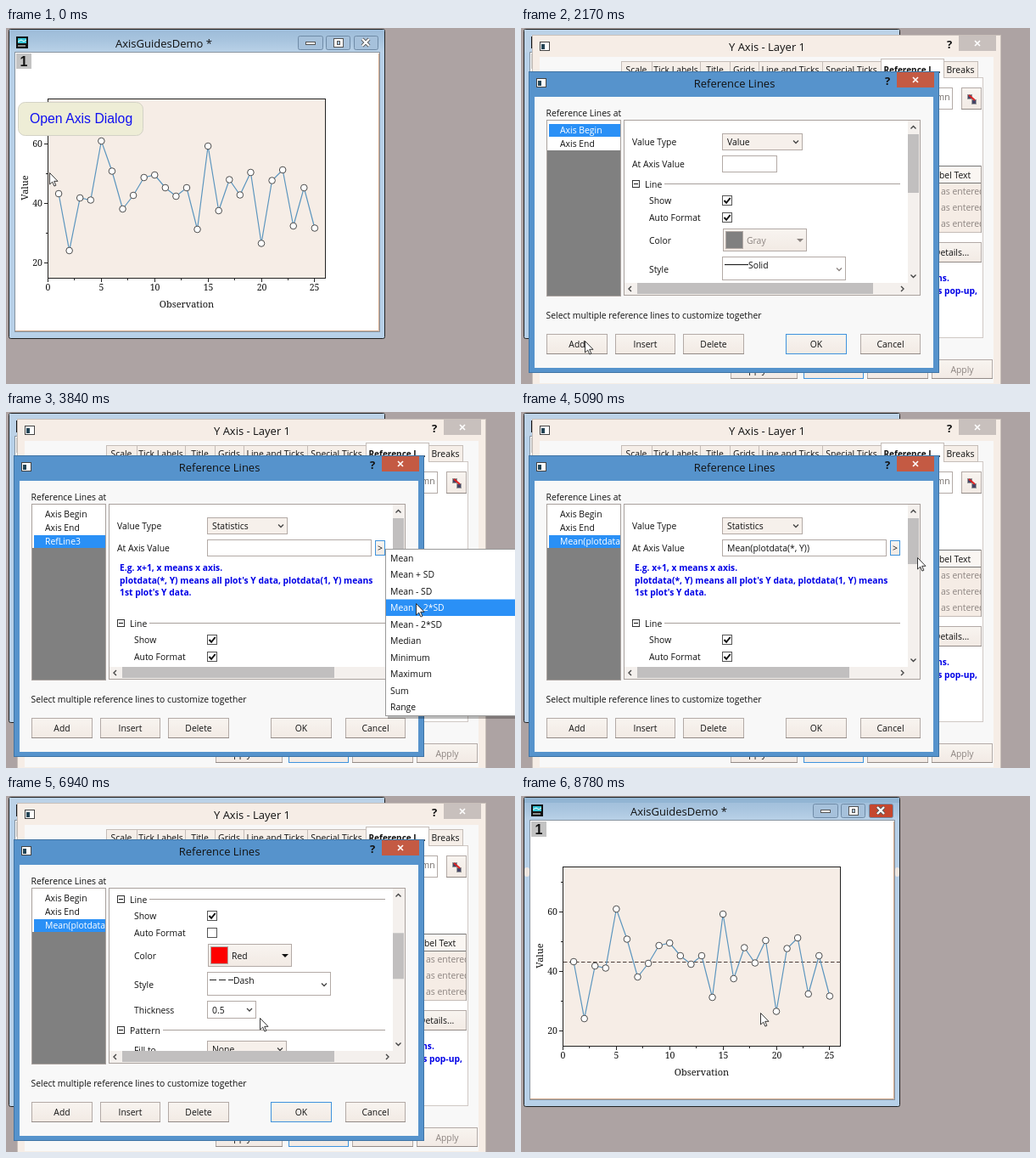
Recreate the animation shown at these times as an HTML page. Size 600x419 px, loop 8.88 s.

```html
<!DOCTYPE html>
<html lang="en">
<head>
<meta charset="utf-8">
<title>Reference line demo</title>
<style>
  html, body { margin: 0; width: 100%; height: 100%; overflow: hidden; background: #ada3a3; }
  svg { display: block; }
  text { font-family: "Open Sans", "Noto Sans", sans-serif; font-size: 10.4px; fill: #111; white-space: pre; }
  .bold { font-weight: 700; font-size: 10px; }
  .note { font-weight: 700; font-size: 10.3px; fill: #0000e6; }
  .tip { font-size: 9.4px; }
  .title { font-size: 13px; }
  .help { font-size: 13px; font-weight: 700; }
  .plot { font-family: "Noto Serif", serif; font-size: 10.5px; }
  .label { font-family: "Noto Serif", serif; font-size: 11px; }
  .badge { font: 700 16px "Liberation Sans", sans-serif; }
  .callout { font: 15.8px "Liberation Sans", sans-serif; fill: #1010f0; }
</style>
</head>
<body>
<svg id="stage" width="600" height="419" viewBox="0 0 600 419"></svg>
<script>
const LOOP = 8880;
const BLUE = '#2a90f6', FRAME = '#5693cc', BEIGE = '#f6ede6', PALE = '#f8f8f8';
const EDGE = '#b3aaa6', MUTED = '#8c8480', TRACK = '#f4f0ed', THUMB = '#c1bfbf';

// Timeline of user actions, in ms
const AT = {
  axisOpen: 450, tabPick: 1120, tip: 1240, tipGone: 1390, refOpen: 1780, add: 2390,
  typeOpen: 2910, typePick: 3110, typeDone: 3160, menuOpen: 3600, meanPick: 4730,
  dragStart: 5240, dragEnd: 5560, autoOff: 5730, colorOpen: 5890, red: 6120,
  styleOpen: 6500, dash: 6880, thickOpen: 7180, one: 7560, refClose: 8040, axisClose: 8440
};

const CURSOR = [
  [0, 51, 170], [450, 51, 170], [1090, 450, 52], [1200, 453, 54], [1360, 453, 54],
  [1740, 506, 264], [1800, 506, 264], [2200, 68, 370], [2420, 68, 370], [2860, 322, 136],
  [2940, 322, 136], [3060, 312, 178], [3280, 312, 178], [3550, 440, 161], [3640, 440, 161],
  [3950, 500, 250], [4270, 490, 172], [4730, 490, 172], [5060, 467, 171], [5100, 467, 171],
  [5230, 463, 150], [5560, 463, 186], [5700, 243, 161], [5740, 243, 161], [5860, 328, 190],
  [5900, 328, 190], [6080, 266, 230], [6180, 266, 234], [6460, 374, 223], [6530, 374, 223],
  [6720, 300, 262], [6890, 300, 262], [7140, 287, 252], [7200, 287, 252], [7480, 262, 318],
  [7600, 262, 318], [7750, 262, 330], [7930, 334, 363], [8060, 334, 363], [8300, 362, 398],
  [8460, 362, 398], [8660, 316, 340], [8780, 282, 255], [LOOP, 282, 255]
];

const POINTS = [195, 262, 200, 202.5, 133, 168.5, 213, 197, 176, 173, 188, 198, 188, 237, 139,
  215, 178.5, 196.5, 170, 253.5, 179.5, 167, 233, 188, 235.5];

const stage = document.getElementById('stage');

// Drawing helpers; boxes are given by their corner pixels
const box = (x0, y0, x1, y1, fill = 'none', stroke, extra = '') => stroke
  ? `<rect x="${x0 + .5}" y="${y0 + .5}" width="${x1 - x0 - 1}" height="${y1 - y0 - 1}" fill="${fill}" stroke="${stroke}" ${extra}/>`
  : `<rect x="${x0}" y="${y0}" width="${x1 - x0}" height="${y1 - y0}" fill="${fill}" ${extra}/>`;
const path = (d, stroke, width = 1, extra = '') =>
  `<path d="${d}" fill="none" stroke="${stroke}" stroke-width="${width}" ${extra}/>`;
const text = (x, y, s, cls = '', fill = '', anchor = 'start') =>
  `<text x="${x}" y="${y}" class="${cls}" text-anchor="${anchor}"${fill && ` style="fill:${fill}"`}>${s}</text>`;
const mid = (x, y, s, cls, fill) => text(x, y, s, cls, fill, 'middle');
const clip = (x0, y0, x1, y1, body) =>
  `<svg x="${x0}" y="${y0}" width="${x1 - x0}" height="${y1 - y0}" viewBox="${x0} ${y0} ${x1 - x0} ${y1 - y0}">${body}</svg>`;
const range = (n, f) => Array.from({ length: n }, (_, i) => f(i)).join('');

const button = (x0, y0, x1, y1, label, focus, fill) =>
  box(x0, y0, x1, y1, 'url(#face)', focus ? '#3f93dd' : EDGE) +
  (focus ? '' : path(`M${x0} ${y1 - .5}H${x1}`, '#938b87')) +
  mid((x0 + x1) / 2, (y0 + y1) / 2 + 4, label, '', fill);
const check = (x, y, on, off) => box(x, y, x + 12, y + 12, off ? '#d8cfca' : '#fff', off ? '#b9b0ac' : '#555') +
  (on ? path(`M${x + 2.5} ${y + 6}l2.6 2.8 4.6-5.8`, '#111', 2) : '');
const chevron = (x, y, color = '#444') => path(`M${x - 3} ${y - 1.5}l3 3 3-3`, color, 1.3);
const combo = (x0, y0, x1, y1, label, fill = '#fff', color = '') =>
  box(x0, y0, x1, y1, fill, EDGE) + text(x0 + 6, (y0 + y1) / 2 + 4, label, '', color) +
  chevron(x1 - 8, (y0 + y1) / 2, color || '#444');
const popup = (x0, y0, x1, y1) => box(x0 + 3, y0 + 3, x1 + 3, y1 + 3, '#0004') + box(x0, y0, x1, y1, '#fff', '#999');

function menu(x0, y0, x1, rowH, items, hover, draw) {
  return popup(x0, y0, x1, y0 + items.length * rowH + 2) + items.map((item, i) => {
    const y = y0 + 1 + i * rowH, on = i === hover;
    return (on ? box(x0 + 1, y, x1 - 1, y + rowH, BLUE) : '') +
      (draw ? draw(item, y, on) : text(x0 + 6, y + rowH / 2 + 4, item, '', on ? '#fff' : ''));
  }).join('');
}

function windowFrame(x0, y0, x1, y1, title, active, bar, side) {
  const cy = y0 + 10;
  return box(x0, y0, x1, y1, active ? FRAME : BEIGE, active ? '#3f74a5' : '#c9c0ba') +
    box(x0 + side, y0 + bar, x1 - side, y1 - 6, PALE) +
    box(x0 + 9, y0 + 8, x0 + 21, y0 + 19, '#fff', '#444') + box(x0 + 11, y0 + 11, x0 + 15, y0 + 17, '#245') +
    mid((x0 + x1) / 2 + .5, y0 + 18.5, title, 'title') + mid(x1 - 61, y0 + 15.5, '?', 'help') +
    box(x1 - 50, y0 + 1, x1 - 6, y0 + 19, active ? '#c45a43' : '#c8c0bd') +
    path(`M${x1 - 31} ${cy - 3}l6 6m0-6l-6 6`, '#fff', 1.6);
}

function graph(done, inactive) {
  const px = v => 49.5 + v * 12.575, py = v => 346 - v * 3.5;
  const xs = POINTS.map((_, i) => px(i + 1));
  let out = box(3, 1, 447, 366, '#b7d0e8', '#222', 'rx="2"') + box(4, 2, 446, 29, inactive ? '#bcd2e7' : 'url(#bar)');
  if (done) out += box(4, 2, 446, 8, '#92b5d3');
  out += box(10, 28, 441, 358, '#fff', '#87939f') + path('M11 356.5H439.5V30', '#d2a98c') +
    box(12, 10, 26, 24, '#111') + box(14, 12, 24, 18, '#38c6d8') + path('M14 16l4-2 3 2 3-2M14 21h9', '#fff') +
    mid(186, 23, 'AxisGuidesDemo *', 'title');
  [[344, 374], [377, 406], [410, 439]].forEach(([a, b], i) => {
    out += box(a, 9, b, 26, done && i === 2 ? '#c5472e' : '#a6c1db', '#6f8ba7', 'rx="2"');
  });
  out += box(353, 16, 365, 20, '#fff', '#555') + box(386, 12, 398, 23, '#fff', '#555') + box(390, 15, 394, 20, '#a6c1db', '#555') +
    path('M420 13l8 8m0-8l-8 8', '#555', 4) + path('M420 13l8 8m0-8l-8 8', '#fff', 2.4) +
    box(12, 30, 30, 48, '#c3c3c3') + mid(21, 45, '1', 'badge') + box(49, 83, 377, 295, BEIGE, '#222');
  for (let v = 20; v <= 70; v += 10) {
    const major = v % 20 === 0, y = Math.round(py(v)) + .5;
    out += path(`M${major ? 45 : 47} ${y}H49`, '#222') + (major ? text(43, y + 3.5, v, 'plot', '', 'end') : '');
  }
  for (let v = 0; v <= 25; v += 2.5) {
    const major = v % 5 === 0, x = Math.round(px(v) - .5) + .5;
    out += path(`M${x} 294V${major ? 299 : 297}`, '#222') + (major ? mid(x, 309, v, 'plot') : '');
  }
  out += mid(213, 329, 'Observation', 'label') +
    `<g transform="translate(25.5 188) rotate(-90)">${mid(0, 0, 'Value', 'label')}</g>`;
  if (done) out += path('M50 195.5H377', '#4a3c38', 1, 'stroke-dasharray="4.5 2.5"');
  out += path('M' + xs.map((x, i) => `${x} ${POINTS[i]}`).join('L'), '#5b95be', 1.2) +
    xs.map((x, i) => `<circle cx="${x}" cy="${POINTS[i]}" r="3.8" fill="#fff" stroke="#4c4c4c"/>`).join('');
  if (done) out += box(4, 84, 10, 95, '#efe6e0', '', 'rx="3"') + box(441, 84, 446, 95, '#efe6e0', '', 'rx="3"');
  return out;
}

const callout = () => box(14, 87, 162, 127, '#eeedd6', '#d3d2c6', 'rx="8"') +
  text(28, 112, 'Open Axis Dialog', 'callout');

const gridIcon = (x, y, s) => box(x, y, x + s, y + s, '#fff') + box(x + 3, y + 3, x + s - 2, y + s - 2, '#fff', '#111') +
  range(4, i => path(`M${x + 5} ${y + 6.5 + i * 4.5}h${s - 9}`, '#222', 1.6, 'stroke-dasharray="1.6 1.4"'));

function scalePage() {
  return [['From', '15'], ['To', '75'], ['Type', 'Linear'], ['Rescale', 'Normal']].map(([name, value], i) => {
    const y = 72 + i * 30;
    return text(130, y + 14, name) + (i < 2 ? box(256, y, 380, y + 20, '#fff', EDGE) + text(262, y + 14, value)
      : combo(256, y, 380, y + 20, value));
  }).join('') + check(130, 196) + text(146, 206, 'Reverse') + text(130, 234, 'Major Ticks') +
    combo(256, 220, 380, 240, 'By Increment') + text(130, 264, 'Minor Ticks') + combo(256, 250, 380, 270, 'By Counts');
}

function linesPage(filled) {
  const cols = [130, 167, 243, 283, 360, 470, 543];
  let out = text(128.5, 82.5, 'Reference Lines at Value') + box(256, 70, 509, 96, '#fff', EDGE) +
    clip(257, 71, 508, 95, filled ? text(260, 85, 'Mean(plotdata(*, Y))')
      : text(260, 85, 'Enter space-separated position OR select a column', '', '#6f6966')) +
    button(519, 70, 543, 96, '') + box(526, 78, 532, 84, '#446', '#999') + box(531, 84, 537, 90, '#446', '#999') +
    path('M528 79l7 6', '#d22', 2) +
    check(129, 108) + text(144, 118, 'Alternate Fill') +
    check(129, 133, false, true) + text(144, 143, 'Alternate Fill Include Axis Begin and Axis End', '', MUTED) +
    box(130, 162, 543, 241, '#fff') + box(360, 183, 543, 241, '#f5ece5') + box(130, 162, 543, 183, '#faf6f2', '#777');
  out += clip(131, 163, 167, 183, text(131, 177, 'Axis Value')) + check(189, 167) + text(201, 177, 'Line') +
    mid(263, 177, 'Fill To') + check(301, 167) + text(313, 177, 'Label') +
    mid(415, 177, 'Label Location') + mid(506, 177, 'Label Text');
  ['Axis Begin', 'Axis End', filled ? 'Mean(plotdata(*, Y))' : ''].forEach((name, i) => {
    const y = 196 + i * 19;
    out += clip(131, y - 12, 167, y + 6, mid(148.5, y, name)) + check(199, y - 10, filled && i === 2) + mid(263, y, 'None') +
      check(315, y - 10) + mid(415, y, 'End', '', MUTED) +
      clip(470, y - 12, 543, y + 6, mid(506.5, y, 'value as entered', '', MUTED)) +
      path(`M130 ${y + 6.5}H${i < 2 ? 360 : 543}`, '#c5bcb7');
  });
  return out + cols.map(x => path(`M${x - .5} 162V241`, '#a39a95')).join('') +
    button(129, 252, 201, 276, 'Insert') + button(212, 252, 284, 276, 'Delete') + button(472, 252, 543, 276, 'Details...') +
    text(130, 298, 'Clear "Reference Lines at Value" box to enable Insert and Delete buttons.', 'note') +
    text(130, 313, 'To add statistics info or other expression as reference line, go to Details pop-up,', 'note') +
    text(130, 328, 'modify value type.', 'note');
}

function axisDialog(t, active) {
  const lines = t >= AT.tabPick;
  let out = windowFrame(13, 8, 566, 424, 'Y Axis - Layer 1', active, 26, 9) +
    box(117, 58, 545, 365, '#fff', '#cfc8c4');
  const tabs = ['Scale', 'Tick Labels', 'Title', 'Grids', 'Line and Ticks', 'Special Ticks', 'Reference L...', 'Breaks'];
  const edges = [118, 154, 211, 246, 280, 355, 424, 498, 538];
  tabs.forEach((name, i) => {
    const on = lines ? i === 6 : i === 0;
    out += box(edges[i], on ? 36 : 39, edges[i + 1] + 1, 59, on ? '#fff' : '#f5eee8', '#c5bdb8') +
      (on ? box(edges[i] + 1, 57, edges[i + 1], 60, '#fff') : '') +
      mid((edges[i] + edges[i + 1]) / 2, 52.5, name, on ? 'bold' : '');
  });
  out += box(23, 58, 113, 367, '#808080', '#8f8f8f') + box(24, 59, 112, 117, '#fff') +
    box(24, 116, 112, 170, BLUE, '#dce9f7', 'stroke-dasharray="1 1"') +
    gridIcon(55, 64, 27) + mid(68.5, 108.5, 'Vertical') + gridIcon(53, 117, 29) + mid(68, 163, 'Horizontal', '', '#fff') +
    (lines ? linesPage(t >= AT.refClose) : scalePage()) +
    text(25, 380, 'Select multiple axes to customize together.') +
    button(247, 390, 326, 413, 'Apply To...') + button(333, 390, 404, 413, 'OK', true) +
    button(408, 390, 480, 413, 'Cancel') + button(484, 390, 556, 413, 'Apply', false, MUTED);
  if (t >= AT.tip && t < AT.tipGone)
    out += box(458, 65, 535, 81, '#0003') + box(456, 63, 533, 79, '#fff', '#888') + text(459, 74.5, 'Reference Lines', 'tip');
  return out;
}

function group(y, name) {
  return box(131, y - 4, 140, y + 5, '#fff', '#333') + path(`M133 ${y + .5}h5`, '#111') +
    text(146, y + 4.5, name) + path(`M${name === 'Line' ? 169 : 185} ${y + .5}H447`, '#a8a09c');
}

function settings(s) {
  const top = -s.scroll, y = (s.stats ? 248 : 183) + top;
  const muted = s.auto ? MUTED : '';
  let out = text(131, 138 + top, 'Value Type') +
    combo(237, 124 + top, 332, 144 + top, s.stats ? 'Statistics' : 'Value', s.hotType ? '#b9d4ee' : '#f6f0eb') +
    text(131, 164 + top, 'At Axis Value') + box(237, 150 + top, s.stats ? 431 : 302, 170 + top, '#fff', EDGE);
  if (s.stats) {
    out += (s.mean ? text(243, 164 + top, 'Mean(plotdata(*, Y))') : '') +
      button(435, 151 + top, 447, 169 + top, '&gt;', true) +
      text(134, 187 + top, 'E.g. x+1, x means x axis.', 'note') +
      text(134, 202 + top, 'plotdata(*, Y) means all plot\'s Y data, plotdata(1, Y) means', 'note') +
      text(134, 216 + top, '1st plot\'s Y data.', 'note');
  }
  out += group(y, 'Line') + text(151, y + 24, 'Show') + check(237, y + 14, true) +
    text(151, y + 44, 'Auto Format') + check(237, y + 34, s.auto) +
    text(151, y + 71, 'Color') + box(238, y + 53, 337, y + 80, 'url(#face)', s.focusColor ? '#2f6fa8' : EDGE) +
    (s.focusColor ? box(239, y + 54, 336, y + 79, 'none', '#222', 'stroke-dasharray="1 1"') : '') +
    box(241, y + 56, 262, y + 77, s.red ? '#f00' : '#808080', EDGE) +
    text(266, y + 71, s.red ? 'Red' : 'Gray', '', muted) +
    `<path d="M325 ${y + 65}h8l-4 4z" fill="${muted || '#111'}"/>` +
    text(151, y + 104.5, 'Style') + box(237, y + 86, 383, y + 114, '#fff', EDGE) +
    path(`M240 ${y + 95.5}H268`, '#222', 1.2, s.dash ? 'stroke-dasharray="8 3"' : '') +
    text(268, y + 100, s.dash ? 'Dash' : 'Solid') + chevron(375, y + 101, muted || '#444') +
    text(151, y + 134.5, 'Thickness') + combo(237, y + 120, 295, y + 141, s.one ? '' : '0.5', '#fff', muted) +
    (s.one ? box(242, y + 123, 249, y + 137, BLUE) + text(242.5, y + 134, '1', '', '#fff') : '') +
    group(y + 154, 'Pattern') + text(151, y + 182, 'Fill to') + combo(237, y + 167, 331, y + 187, 'None', '#f6f0eb');
  return out;
}

function scrollbars(s) {
  const y = 125 + s.scroll / 3.5;
  return box(456, 109, 470, 300, TRACK) + box(456, y, 469, y + (s.stats ? 54 : 69), THUMB) +
    path('M459.5 118.5l3-3 3 3M459.5 290.5l3 3 3-3', '#444', 1.4) +
    box(122, 300, 470, 314, TRACK) + box(137, 300, s.stats ? 387 : 415, 313, THUMB) +
    path('M130 304l-3 3 3 3M448 304l3 3-3 3', '#444', 1.4);
}

function palette() {
  const colors = ['#000', '#f00', '#0c0', '#00f', '#0cc', '#f0f', '#cc0', '#808080'];
  return popup(238, 202, 420, 419) + text(244, 216, 'Individual Color') +
    range(64, i => {
      const x = 244 + i % 8 * 21, y = 222 + (i >> 3) * 21;
      return box(x, y, x + 18, y + 18, colors[i % 8], '#999', `fill-opacity="${1 - (i >> 3) * .11}"`);
    }) + text(244, 407, 'Custom...');
}

function refDialog(t, cursorY) {
  const u = Math.min(1, Math.max(0, (t - AT.dragStart) / (AT.dragEnd - AT.dragStart)));
  const between = (a, b) => t >= a && t < b;
  const s = {
    scroll: 126.5 * u * u * (3 - 2 * u), stats: t >= AT.typeDone, mean: t >= AT.meanPick,
    hotType: between(AT.typeOpen - 60, AT.typeDone), auto: t < AT.autoOff, red: t >= AT.red,
    focusColor: between(AT.colorOpen, AT.styleOpen), dash: t >= AT.dash, one: t >= AT.one
  };
  s.scroll = Math.round(s.scroll);
  const added = t >= AT.add, picking = between(AT.colorOpen, AT.red);
  const names = ['Axis Begin', 'Axis End'].concat(added ? s.mean ? 'Mean(plotdata(*, Y))' : 'RefLine3' : []);
  const hover = (y0, h) => Math.max(0, Math.floor((cursorY - y0) / h));

  let out = windowFrame(9, 51, 493, 406, 'Reference Lines', !picking, 30, 7) +
    text(29.5, 104, 'Reference Lines at') + box(30, 108, 118, 316, '#808080', '#a9a19d') + box(31, 109, 117, 112 + names.length * 16, '#fff');
  out += clip(31, 109, 117, 315, names.map((name, i) => {
    const on = i === (added ? 2 : 0), y = 113 + i * 16;
    return (on ? box(33, y, 117, y + 15, BLUE) : '') + text(46, y + 11, name, '', on ? '#fff' : '');
  }).join('')) +
    box(121, 108, 471, 315, '#fff', '#a9a19d') + clip(122, 109, 456, 300, settings(s)) + scrollbars(s) +
    text(29.5, 342, 'Select multiple reference lines to customize together') +
    button(30, 360, 102, 384, 'Add', between(AT.add, AT.menuOpen)) + button(111, 360, 182, 384, 'Insert') +
    button(191, 360, 263, 384, 'Delete') + button(312, 360, 384, 384, 'OK', t < AT.add || t >= AT.autoOff) +
    button(400, 360, 471, 384, 'Cancel');

  if (between(AT.typeOpen, AT.typePick)) out += menu(237, 145, 331, 21, ['Value', 'Statistics'], hover(146, 21));
  if (between(AT.typePick, AT.typeDone)) out += path('M241 190.5H332.5V150', '#6f6865', 1.5);
  if (between(AT.menuOpen, AT.meanPick))
    out += menu(447, 161, 610, 19.5, ['Mean', 'Mean + SD', 'Mean - SD', 'Mean + 2*SD', 'Mean - 2*SD', 'Median', 'Minimum', 'Maximum', 'Sum', 'Range'],
      hover(162, 19.5));
  if (picking) out += palette();
  if (between(AT.styleOpen, AT.dash))
    out += menu(237, 236, 383, 20, ['Solid', 'Dash', 'Dot', 'Dash Dot', 'Dash Dot Dot', 'Short Dash', 'Short Dot', 'Short Dash Dot', 'None'],
      hover(237, 20), (name, y, on) => {
        const dash = name.includes('Dash') ? name.includes('Dot') ? '8 3 2 3' : '8 3' : name.includes('Dot') ? '2 3' : '';
        return (name === 'None' ? '' : path(`M240 ${y + 10.5}H268`, on ? '#fff' : '#222', 1.2, `stroke-dasharray="${dash}"`)) +
          text(270, y + 14, name, '', on ? '#fff' : '');
      });
  if (between(AT.thickOpen, AT.one))
    out += menu(237, 262, 295, 17, ['0.2', '0.3', '0.5', '1', '1.5', '2', '3', '4', '5'], hover(263, 17));
  return out;
}

function cursorAt(t) {
  const i = Math.max(1, CURSOR.findIndex(key => key[0] > t));
  const [t0, x0, y0] = CURSOR[i - 1], [t1, x1, y1] = CURSOR[i];
  const u = (t - t0) / (t1 - t0), e = u * u * (3 - 2 * u);
  return [x0 + (x1 - x0) * e, y0 + (y1 - y0) * e];
}

const gradient = (id, ...colors) => `<linearGradient id="${id}" x2="0" y2="1">` +
  colors.map((c, i) => `<stop offset="${i / (colors.length - 1)}" stop-color="${c}"/>`).join('') + '</linearGradient>';
const DEFS = `<defs>${gradient('bar', '#9dbcd9', '#a9c5df', '#bad2e8')}${gradient('face', '#f8f4f0', '#f2eae4')}</defs>`;

let shown = '';
function render(t) {
  const [x, y] = cursorAt(t);
  const refOpen = t >= AT.refOpen && t < AT.refClose;
  const axisOpen = t >= AT.axisOpen && t < AT.axisClose;
  let out = DEFS + box(0, 0, 600, 419, '#ada3a3') + graph(t >= AT.axisClose, axisOpen);
  if (t < AT.axisOpen) out += callout();
  if (axisOpen) out += axisDialog(t, !refOpen);
  if (refOpen) out += refDialog(t, y);
  out += `<path transform="translate(${Math.round(x) + .5} ${Math.round(y) + .5})" fill="#fff" stroke="#222" stroke-width=".9"
    d="M0 0V13.5L3.2 10.6 5.4 15.6 7.4 14.7 5.2 9.8H9.5Z"/>`;
  if (out !== shown) stage.innerHTML = shown = out;
}

const start = performance.now();
function tick() {
  render((performance.now() - start) % LOOP);
  requestAnimationFrame(tick);
}
tick();
</script>
</body>
</html>
```
